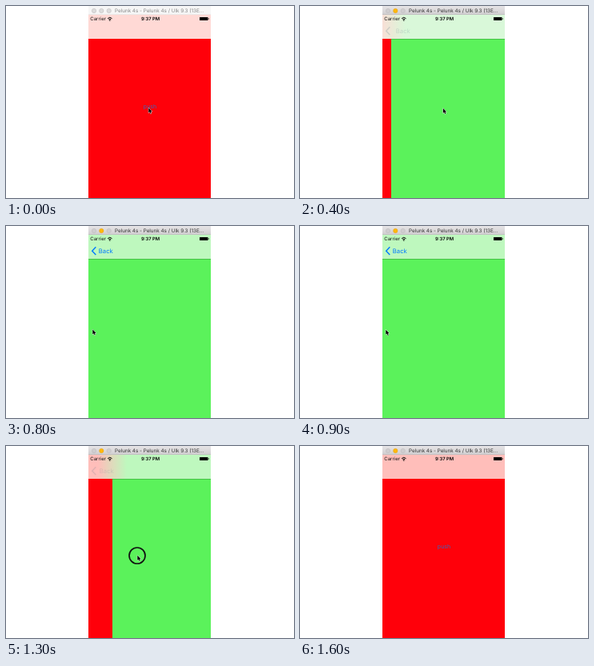
An HTML page with a canvas that plays this animation: 360x240 px, repeating every 1.7 s.

```html
<!DOCTYPE html>
<html lang="en">
<head>
<meta charset="utf-8">
<style>
  html, body { margin: 0; width: 100%; height: 100%; overflow: hidden; background: #fff; }
  canvas { display: block; }
</style>
</head>
<body>
<canvas id="stage" width="360" height="240"></canvas>
<script>
const ctx = document.getElementById('stage').getContext('2d');
const LOOP = 1700, STEP = 100;
const LEFT = 103, RIGHT = 256, WIDTH = RIGHT - LEFT, BAR_TOP = 11, BAR_BOTTOM = 41;
const RED = '#ff000a', GREEN = '#5bf25b', BLUE = '#007aff';

// Each key is [step, value...]; values between keys are interpolated.
const edgeKeys = [[3, RIGHT], [4, 114], [5, 104], [6, LEFT], [11, LEFT], [12, 106], [13, 133], [14, 204], [15, 248], [16, RIGHT]];
const cursorKeys = [[0, 178, 127], [4, 178.5, 127.5], [5, 176, 128], [6, 150, 128.5], [7, 120, 129],
  [8, 108, 129], [11, 105, 130], [12, 117, 132], [13, 164, 136.5], [14, 218, 138], [15, 262, 139]];
const backKeys = [[3, 0, 8], [4, .22, 4], [5, .75, 1], [6, 1, 0], [11, 1, 0], [12, .6, 0], [13, .18, 1], [14, .05, 4], [15, 0, 6]];
const toneKeys = [[0, 217], [4, 217], [8, 190], [16, 190]];

function sample(keys, step) {
  let i = keys.findIndex(k => k[0] >= step);
  if (i < 0) i = keys.length - 1;
  const b = keys[i], a = keys[Math.max(0, i - 1)];
  const p = b[0] === a[0] ? 0 : Math.min(1, (step - a[0]) / (b[0] - a[0]));
  return b.slice(1).map((v, n) => i === 0 ? v : a[n + 1] + (v - a[n + 1]) * p);
}

function rect(x, y, w, h, fill) {
  ctx.fillStyle = fill;
  ctx.fillRect(x, y, w, h);
}

function disc(x, y, r, fill, line) {
  ctx.beginPath();
  ctx.arc(x, y, r, 0, 7);
  ctx.fillStyle = fill;
  ctx.fill();
  ctx.strokeStyle = line;
  ctx.lineWidth = .5;
  ctx.stroke();
}

function text(str, x, y, size, fill, align = 'left', weight = 400) {
  ctx.font = `${weight} ${size}px Inter, Roboto, sans-serif`;
  ctx.textRendering = 'geometricPrecision';
  ctx.textAlign = align;
  ctx.fillStyle = fill;
  ctx.fillText(str, x, y);
}

function gradient(x0, y0, x1, y1, from, to) {
  const g = ctx.createLinearGradient(x0, y0, x1, y1);
  g.addColorStop(0, from);
  g.addColorStop(1, to);
  return g;
}

function titleBar(active) {
  rect(LEFT, 0, WIDTH, BAR_TOP, active ? gradient(0, 0, 0, BAR_TOP, '#e6e4e6', '#d0ced0') : '#f6f6f6');
  rect(LEFT, BAR_TOP - .5, WIDTH, .5, active ? '#b5b3b5' : '#ddd');
  [110, 119.3, 128.7].forEach((x, i) => {
    const yellow = active && i === 1;
    disc(x, 6, 2.7, yellow ? '#ffb80c' : active ? '#cfcdcf' : '#dcdcdc', yellow ? '#dfa023' : '#bdbbbd');
  });
  text('Pelunk 4s - Pelunk 4s / Ulk 9.3 (13E…', 136, 8.3, 6.3, active ? '#333' : '#888');
}

function statusBar() {
  text('Carrier', 105.3, 18.2, 6, '#111');
  text('9:37 PM', 180.5, 18.2, 5.8, '#000', 'center', 600);
  ctx.strokeStyle = '#000';
  ctx.lineWidth = 1;
  for (const r of [2, 3.8]) {
    ctx.beginPath();
    ctx.arc(129.8, 18.3, r, Math.PI * 1.25, Math.PI * 1.75);
    ctx.stroke();
  }
  disc(129.8, 17.9, .5, '#000', '#000');
  rect(242, 14, 10.4, 4, '#000');
  rect(252.8, 15.2, .8, 1.6, '#000');
}

function navBar(edge, step) {
  const [tone] = sample(toneKeys, step);
  const pink = `rgb(255,${tone},${tone - 4})`, mint = `rgb(${tone},248,${tone})`;
  const fill = edge >= RIGHT ? pink : edge <= LEFT ? mint
    : gradient(edge - 18, 0, edge + 18, 0, pink, mint);
  rect(LEFT, BAR_TOP, WIDTH, BAR_BOTTOM - BAR_TOP, fill);
  if (edge < RIGHT) rect(edge, BAR_BOTTOM, RIGHT - edge, 1, 'rgba(0,0,0,.2)');

  const [alpha, shift] = sample(backKeys, step);
  ctx.save();
  ctx.globalAlpha = alpha;
  const tint = alpha < .3 ? '#55778a' : BLUE;
  ctx.strokeStyle = tint;
  ctx.lineWidth = 1.4;
  ctx.beginPath();
  ctx.moveTo(112.3, 26.3);
  ctx.lineTo(107.7, 31.2);
  ctx.lineTo(112.3, 36.1);
  ctx.stroke();
  text('Back', 115.8 + shift, 34.1, 7.7, tint);
  ctx.restore();
}

function cursor(x, y, touching) {
  if (touching) {
    ctx.strokeStyle = '#111';
    ctx.lineWidth = 1.7;
    ctx.beginPath();
    ctx.arc(x, y + .5, 10, 0, 7);
    ctx.stroke();
  }
  const arrow = new Path2D('M0 0V7.3L1.7 5.8L2.9 8.6L4.1 8L2.9 5.4H5.2Z');
  ctx.save();
  ctx.translate(x + .3, y + .3);
  ctx.scale(.85, .85);
  ctx.strokeStyle = '#fff';
  ctx.lineWidth = 1;
  ctx.stroke(arrow);
  ctx.fillStyle = '#000';
  ctx.fill(arrow);
  ctx.restore();
}

function draw(step) {
  rect(0, 0, 360, 240, '#fff');
  ctx.save();
  ctx.beginPath();
  ctx.rect(LEFT, 0, WIDTH, 240);
  ctx.clip();

  const [edge] = sample(edgeKeys, step);
  rect(LEFT, BAR_TOP, WIDTH, 240 - BAR_TOP, RED);
  text('push', 180 - .3 * (RIGHT - edge), 128, 7, '#3d62b8', 'center');
  rect(edge, BAR_TOP, RIGHT - edge, 240 - BAR_TOP, GREEN);
  navBar(edge, step);
  statusBar();
  titleBar(step > 0);
  if (step < 16) cursor(...sample(cursorKeys, step), step >= 12);
  ctx.restore();
}

function tick() {
  draw(Math.floor(performance.now() % LOOP / STEP));
  requestAnimationFrame(tick);
}
tick();
</script>
</body>
</html>
```
